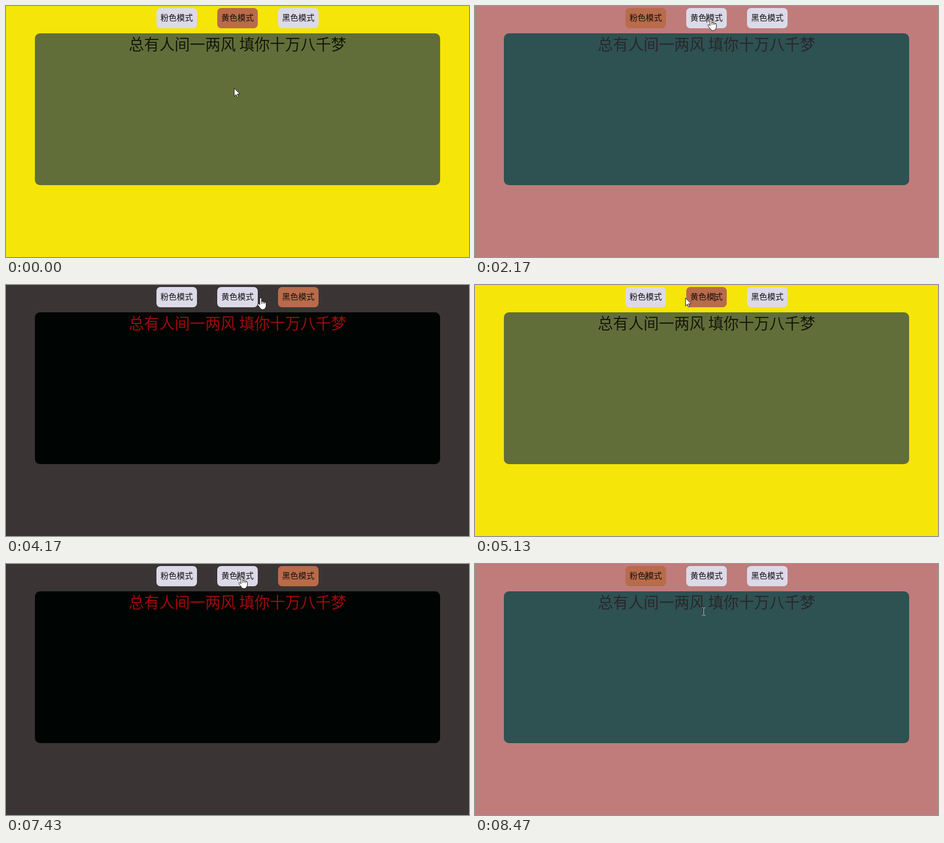
These frames come from a looping animation (914 px wide and 496 px high, 8510 ms). An HTML page with a canvas:

```html
<!DOCTYPE html>
<html lang="zh-CN">
<head>
<meta charset="utf-8">
<title>Colour modes</title>
<style>
  html, body { margin: 0; width: 100%; height: 100%; overflow: hidden; }
  canvas { display: block; }
</style>
</head>
<body>
<canvas id="stage" width="914" height="496"></canvas>
<script>
const ctx = document.getElementById('stage').getContext('2d');
const LOOP = 8510;
const PRESS = 130;   // mouse down to mouse up, also the rest before moving on
const BLINK = 500;
const TRAVEL = 400;

const modes = [
  { label: '粉色模式', page: '#bf7c7b', panel: '#2e5152', text: '#29272b' },
  { label: '黄色模式', page: '#f5e508', panel: '#626e39', text: '#14160a' },
  { label: '黑色模式', page: '#3a3534', panel: '#000504', text: '#9d0c0c' }
];
const [pink, yellow, black] = modes;
modes.forEach((mode, i) => mode.x = 297 + 120 * i);

// The pointer sweeps back and forth over the buttons: unhurried first, then at a steady pace.
const sweep = [pink, yellow, black, yellow];
const slowGaps = [1430, 770, 1300, 1300];
const STEADY_GAP = 670;
let clock = 0;
const clicks = [...'322334222'].map((chars, i) => {
  const mode = sweep[i % sweep.length];
  const up = clock += slowGaps[i] ?? STEADY_GAP;
  const caret = mode.x + 8 + 16 * chars;
  return { mode, up, down: up - PRESS, caret, x: caret + 2, y: 25 };
});
const stops = [
  { up: 0, x: 450, y: 162, travel: 940 },
  ...clicks,
  { down: 8470, x: 451, y: 94 }
];

const hand = new Path2D('M5 2 Q5 .5 6.7 .5 Q8.5 .5 8.5 2 V8 Q10 6.5 11.5 8.3 Q13 7.2 14.3 9 Q17.5 8.5 17.5 11.5 V16 Q17.5 19 15.5 21 Q14.5 23.5 10.5 23.5 Q7.5 23.5 6 21 L1.2 14.5 Q0 12.5 1.5 11.8 Q3 11.2 5 14 Z');
const knuckles = new Path2D('M8.5 8 V12 M11.5 8.5 V12 M14.4 9 V12.5');
const arrow = new Path2D('M.5 .5 V16.5 L4.2 13 L6.8 18.7 L9 17.7 L6.5 12.1 H11.7 Z');

// Each move is centred between two clicks, or follows the first after a short rest.
function pointerAt(t) {
  const next = stops.findIndex((stop, i) => i > 0 && (stop.up ?? LOOP) > t);
  const from = stops[next - 1], to = stops[next];
  const gap = to.down - from.up;
  const travel = Math.min(from.travel ?? TRAVEL, gap - PRESS);
  const begin = from.up + Math.max(PRESS, (gap - travel) / 2);
  const p = Math.min(1, Math.max(0, (t - begin) / travel));
  const ease = p * p * (3 - 2 * p);
  return [from.x + (to.x - from.x) * ease, from.y + (to.y - from.y) * ease];
}

function box(x, y, w, h, r, color) {
  ctx.fillStyle = color;
  ctx.beginPath();
  ctx.roundRect(x, y, w, h, r);
  ctx.fill();
}

function label(text, x, y, size, color) {
  ctx.font = `300 ${size}px "Noto Sans CJK SC", "Noto Sans CJK", sans-serif`;
  ctx.textAlign = 'center';
  ctx.fillStyle = color;
  ctx.fillText(text, x, y);
}

function outline(shape) {
  ctx.fillStyle = '#fff';
  ctx.strokeStyle = '#111';
  ctx.lineWidth = 1;
  ctx.fill(shape);
  ctx.stroke(shape);
}

function drawPointer(x, y) {
  const overButton = y >= 4 && y < 44 &&
    modes.some(mode => x >= mode.x && x < mode.x + 80);
  ctx.save();
  ctx.translate(Math.round(x), Math.round(y));
  if (overButton) {
    outline(hand);
    ctx.stroke(knuckles);
  } else if (y >= 54 && y < 98) {
    ctx.globalCompositeOperation = 'difference';
    ctx.fillStyle = '#fff';
    ctx.fillRect(0, -7, 1, 14);
    for (const end of [-8, 7]) {
      ctx.fillRect(-3, end, 3, 1);
      ctx.fillRect(1, end, 3, 1);
    }
  } else {
    outline(arrow);
  }
  ctx.restore();
}

function draw(t) {
  const active = clicks.findLast(click => click.up <= t)?.mode ?? yellow;

  ctx.fillStyle = active.page;
  ctx.fillRect(0, 0, 914, 496);
  box(57, 54, 800, 300, 10, active.panel);
  label('总有人间一两风 填你十万八千梦', 457, 87, 30.2, active.text);

  for (const mode of modes) {
    box(mode.x, 4, 80, 40, 8, mode === active ? '#b96b4a' : '#dcdae8');
    label(mode.label, mode.x + 40, 29, 16, '#111');
  }

  const pressed = clicks.findLast(click => click.down <= t);
  if (pressed && (t - pressed.down) % (2 * BLINK) < BLINK) {
    ctx.fillStyle = '#000';
    ctx.fillRect(pressed.caret, 15, 1, 18);
  }
  drawPointer(...pointerAt(t));
}

const start = performance.now();
function tick() {
  draw((performance.now() - start) % LOOP);
  requestAnimationFrame(tick);
}
tick();
</script>
</body>
</html>
```
